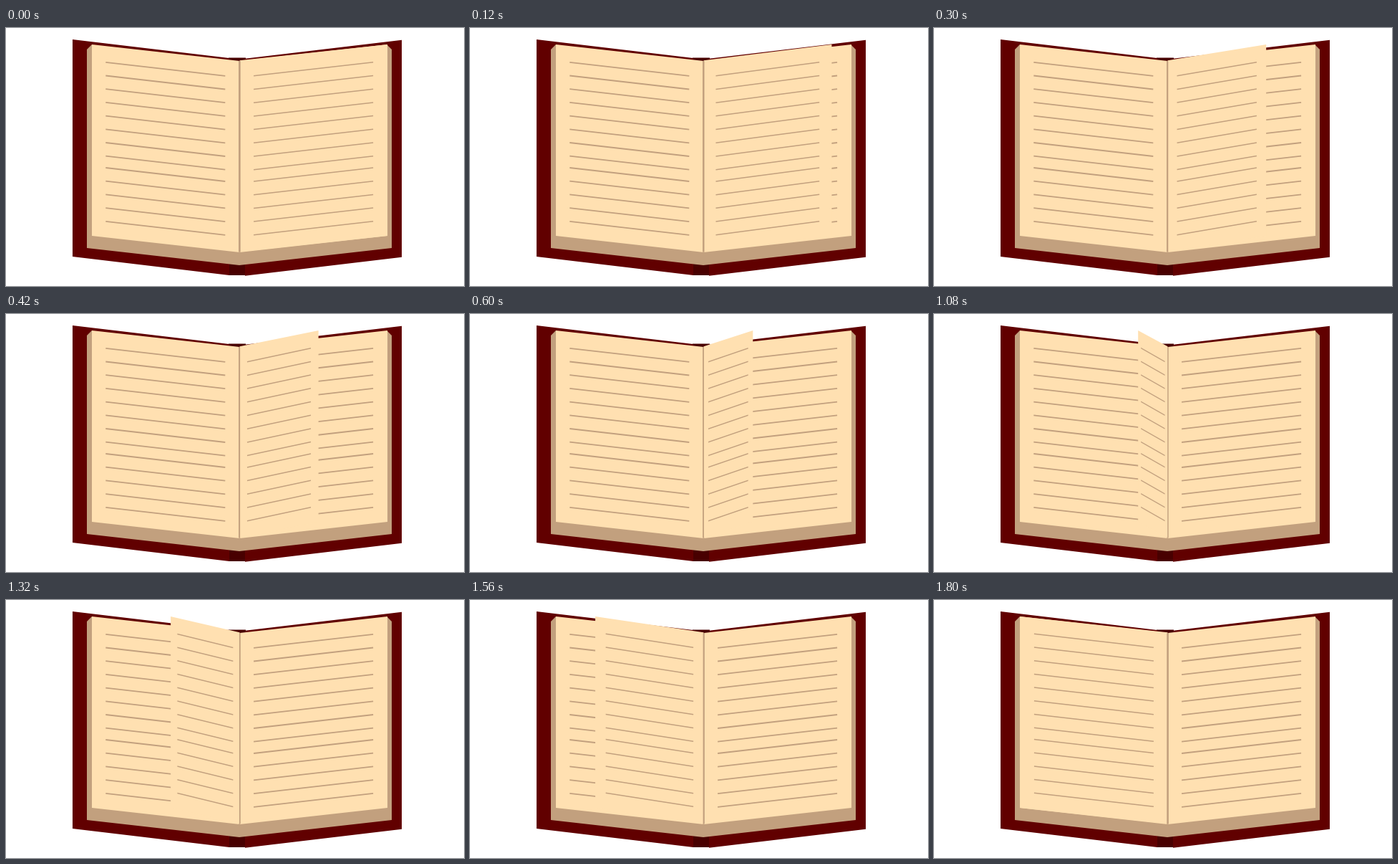
These frames come from a looping animation (640x360 px, 1.86 s). An HTML page with a canvas:

```html
<!DOCTYPE html>
<html lang="en">
<head>
<meta charset="utf-8">
<title>Book turning a page</title>
<style>
html, body { margin: 0; width: 100%; height: 100%; overflow: hidden; background: #fff; }
canvas { display: block; }
</style>
</head>
<body>
<canvas id="stage" width="640" height="360"></canvas>
<script>
const ctx = document.getElementById('stage').getContext('2d');
const COVER = '#610000', SPINE = '#480000', EDGE = '#c2a07e', PAPER = '#ffe0b1';
const STEP = 60, STEPS = 31;
const HINGE = 326.5, WIDTH = 206.5, ROWS = 13, PITCH = 18.7;

// Runs paint with x measured from an axis; scale -1 mirrors it to the left.
function from(axis, scale, paint) {
  ctx.save();
  ctx.translate(axis, 0);
  ctx.scale(scale, 1);
  paint();
  ctx.restore();
}

// Upright strip whose parallel top and bottom slope between two distances.
function band(color, near, far, topNear, topFar, height) {
  ctx.fillStyle = color;
  ctx.beginPath();
  ctx.moveTo(near, topNear);
  ctx.lineTo(far, topFar);
  ctx.lineTo(far, topFar + height);
  ctx.lineTo(near, topNear + height);
  ctx.fill();
}

function line(x1, y1, x2, y2, width) {
  ctx.lineWidth = width;
  ctx.beginPath();
  ctx.moveTo(x1, y1);
  ctx.lineTo(x2, y2);
  ctx.stroke();
}

function page(scale, top = 46, ink = 1.8, shift = 0, lift = 0) {
  from(HINGE, scale, () => {
    band(PAPER, 0, WIDTH, top, 23, 290 - 23);
    ctx.strokeStyle = EDGE;
    for (let i = 0; i < ROWS; i++) {
      const y = 47.8 + PITCH * i - (i > 7 ? 2.4 : 0) - lift;
      line(19.6 + shift, y + 19, 186.6 + shift, y, ink);
    }
    line(0, 46, 0, 312.5, 2.4);
  });
}

function binding(side) {
  const drop = side > 0 ? 0.8 : 0;
  from(323, side, () => band(COVER, 11, 230, 42 + drop, 16 + drop, 303));
  from(326, side, () => {
    band(EDGE, 0, 213, 54, 30, 277);
    band(EDGE, 206, 213, 23, 30, 270);
  });
}

function draw(time) {
  const turn = Math.floor(time / STEP) % STEPS / (STEPS - 1);
  const scale = 1 - 2 * turn;
  ctx.clearRect(0, 0, 640, 360);
  band(SPINE, 311, 335, 41.6, 41.6, 303.4);
  binding(-1);
  binding(1);
  page(-1, 46, 1.8, 0.6);
  page(1);
  // The turning sheet is edge-on, and so invisible, halfway through.
  if (scale) page(scale, 45.2, 1.5, 0, turn / 2);
}

const start = performance.now();
function tick() {
  draw(performance.now() - start);
  requestAnimationFrame(tick);
}
tick();
</script>
</body>
</html>
```
